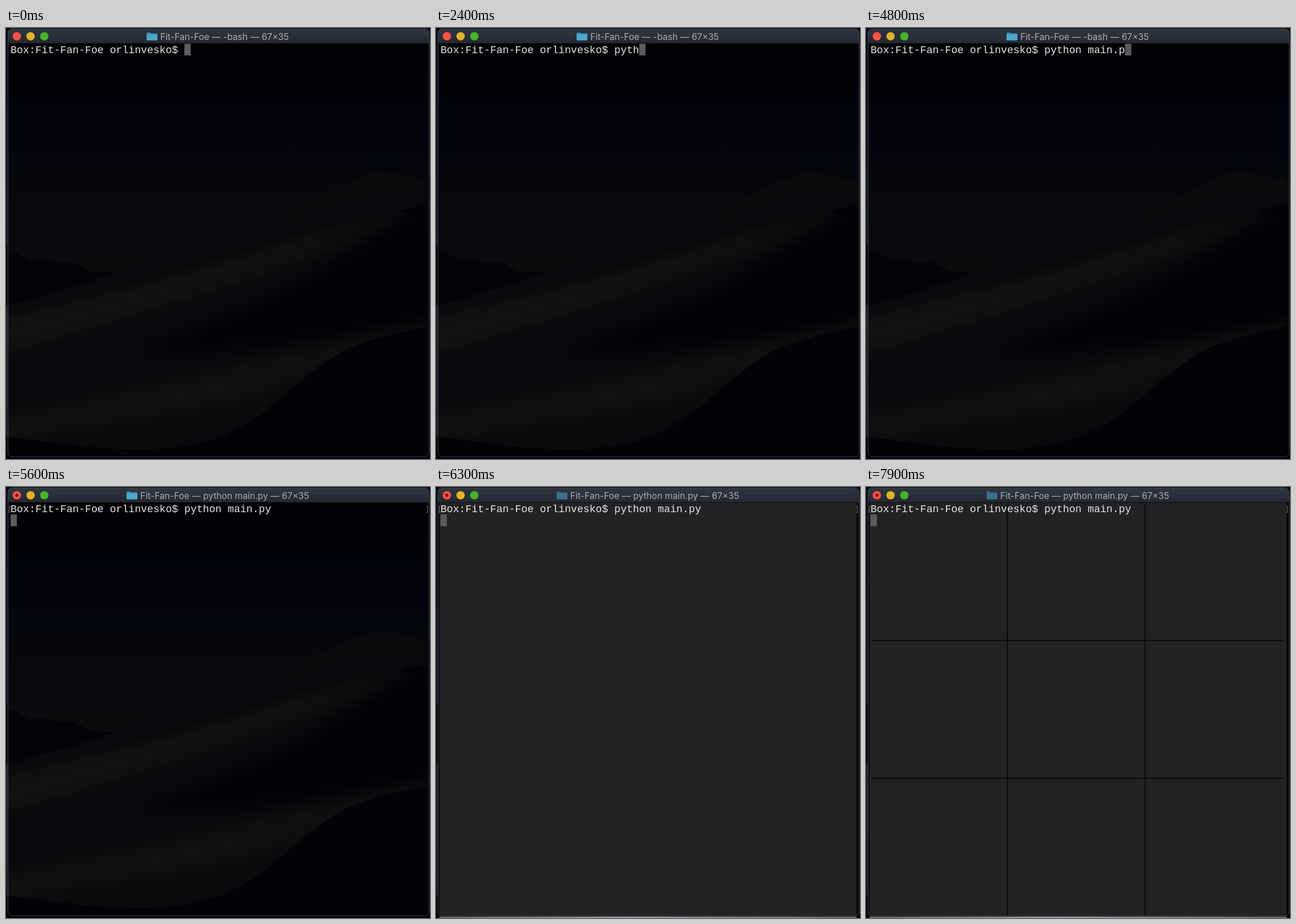
Recreate the animation shown at these times as an HTML page. Size 742x754 px, loop 8000 ms.

```html
<!DOCTYPE html>
<html lang="en">
<head>
<meta charset="utf-8">
<title>Terminal session</title>
<style>
  html, body { margin: 0; width: 100%; height: 100%; overflow: hidden; background: #02030a; }
  svg { display: block; width: 742px; height: 754px; }
  text { white-space: pre; }
  .mono { font: 18.1px "Liberation Mono", monospace; fill: #e6e6e6; }
  .title { font: 15.6px Inter, sans-serif; fill: #a9acb2; }
</style>
</head>
<body>
<svg viewBox="0 0 742 754">
  <defs>
    <linearGradient id="bar" x2="0" y2="1">
      <stop stop-color="#303641"/><stop offset="1" stop-color="#232831"/>
    </linearGradient>
    <linearGradient id="sky" gradientUnits="userSpaceOnUse" x1="0" y1="27" x2="0" y2="440">
      <stop stop-color="#000104"/><stop offset=".2" stop-color="#010309"/>
      <stop offset=".4" stop-color="#02050e"/><stop offset=".56" stop-color="#05070d"/>
      <stop offset=".75" stop-color="#08090d"/><stop offset="1" stop-color="#0b0b0d"/>
    </linearGradient>
    <linearGradient id="edge" x2="0" y2="1">
      <stop stop-color="#060912"/><stop offset=".5" stop-color="#131720"/>
      <stop offset=".51" stop-color="#030408"/><stop offset=".64" stop-color="#030408"/>
      <stop offset=".645" stop-color="#1d2027"/><stop offset=".945" stop-color="#191c23"/>
      <stop offset=".95" stop-color="#030408"/>
    </linearGradient>
    <linearGradient id="rim">
      <stop stop-color="#6c6c6e"/><stop offset=".45" stop-color="#a4a4a6"/><stop offset="1" stop-color="#6c6c6e"/>
    </linearGradient>
    <filter id="soft" filterUnits="userSpaceOnUse" x="-100" y="140" width="960" height="720" color-interpolation-filters="sRGB">
      <feGaussianBlur stdDeviation="15"/>
    </filter>
    <clipPath id="screen"><path d="M4 27H740V743Q740 749 734 749H10Q4 749 4 743Z"/></clipPath>
    <clipPath id="dune"><path d="M0 486C70 467 130 449 190 428C280 397 370 364 460 330C520 306 575 282 630 256Q655 246 742 269V754H0Z"/></clipPath>
  </defs>

  <rect width="742" height="754" fill="#02030a"/>
  <rect width="3" height="754" fill="url(#edge)"/>

  <g clip-path="url(#screen)">
    <rect y="27" width="742" height="727" fill="url(#sky)"/>
    <g fill="#20232b">
      <circle cx="410" cy="101" r=".9"/><circle cx="26" cy="80" r=".7"/><circle cx="500" cy="85" r=".7"/>
      <circle cx="79" cy="135" r=".8"/><circle cx="505" cy="210" r=".7"/>
    </g>
    <path d="M0 386L24 396L44 406L68 404L92 411L112 409L134 419L152 427L190 428L150 445L0 488Z" fill="#030408"/>
    <g clip-path="url(#dune)">
      <g filter="url(#soft)" fill="none">
        <rect x="-60" y="180" width="860" height="640" fill="#08090c"/>
        <path d="M470 335Q560 305 650 258L790 285" stroke="#0b0b0d" stroke-width="26"/>
        <path d="M200 455Q430 375 600 310" stroke="#06070a" stroke-width="28"/>
        <path d="M-40 580V515C160 475 400 405 700 315C560 400 350 465 -40 580Z" fill="#121211"/>
        <path d="M705 325L800 330V505C640 520 460 565 210 570C390 515 560 430 705 325Z" fill="#020206"/>
        <path d="M-40 735V685C170 645 400 590 780 515V545C600 570 520 610 440 640C280 690 140 690 -40 735Z" fill="#111110"/>
        <path d="M120 735Q330 715 480 635" stroke="#0b0b0c" stroke-width="24"/>
      </g>
      <path d="M688 320Q704 313 742 313V344Q720 330 688 320Z" fill="#020307"/>
    </g>
    <path d="M0 715C60 721 130 735 215 737C330 740 390 717 450 673C500 633 535 595 595 562C640 542 690 533 742 521V754H0Z" fill="#020207"/>
  </g>

  <g id="board">
    <rect x="6" y="27" width="730" height="723" fill="#232123"/>
    <path d="M4 27h2v723h-2zM736 27h4v723h-4z" fill="#050609"/>
    <rect x="6" y="751.5" width="730" height="2.5" fill="url(#rim)"/>
    <path id="grid" d="M247.5 31V749M488.5 31V749M10 268.5H729M10 509.5H729" stroke="#070709" stroke-width="1.8"/>
  </g>

  <path d="M3 27V9Q3 2 10 2H733Q740 2 740 9V27Z" fill="url(#bar)"/>
  <path d="M4 27H740" stroke="#0b0d12"/>
  <rect x="3.5" y="1.5" width="737" height="748.5" rx="7" fill="none" stroke="#3e4149"/>

  <circle cx="19" cy="14.5" r="7.3" fill="#ff5145"/>
  <circle cx="43" cy="14.5" r="7.3" fill="#e1b425"/>
  <circle cx="67" cy="14.5" r="7.3" fill="#46b52b"/>
  <circle id="busy" cx="19" cy="14.5" r="2.7" fill="#750b08"/>

  <g id="heading">
    <g id="folder">
      <path d="M0 9.5Q0 8 1.5 8H6L8 9.5H17.5Q19 9.5 19 11V20Q19 21.5 17.5 21.5H1.5Q0 21.5 0 20Z" fill="#3f92b6"/>
      <path d="M0 11.5H19V20Q19 21.5 17.5 21.5H1.5Q0 21.5 0 20Z" fill="#4ca8ce"/>
    </g>
    <text class="title" x="24" y="20.5">Fit-Fan-Foe</text>
    <text class="title" id="process" x="114" y="20.5"></text>
  </g>

  <rect id="cursor" width="11" height="20.5" fill="#5c5c5e"/>
  <text class="mono" id="line" x="8" y="44"></text>
  <path id="marks" d="M7.5 33.5H5.5V44.5H7.5M735.5 33.5H737.5V44.5H735.5" fill="none" stroke="#77787b"/>
</svg>
<script>
  const LOOP = 8000, CHAR = 10.862;
  const PROMPT = "Box:Fit-Fan-Foe orlinvesko$ ";
  const COMMAND = "python main.py";
  const KEY_TIMES = [1800, 2000, 2200, 2400, 2500, 2700, 2900, 3000, 3200, 3400, 3500, 4200, 4700, 5000];
  const RUN = 5600, BLUR = 6000, BOARD = 6300, GRID = 6400;

  const el = id => document.getElementById(id);
  const show = (id, on) => el(id).setAttribute("visibility", on ? "visible" : "hidden");
  const start = performance.now();

  function draw(t) {
    const running = t >= RUN;
    const typed = KEY_TIMES.filter(k => k <= t).length;
    const line = PROMPT + COMMAND.slice(0, typed);

    el("line").textContent = line;
    el("cursor").setAttribute("x", running ? 8 : 8 + line.length * CHAR);
    el("cursor").setAttribute("y", running ? 48 : 27.5);
    el("heading").setAttribute("transform", `translate(${running ? 211 : 246})`);
    el("process").textContent = running ? "— python main.py — 67×35" : "— -bash — 67×35";
    el("folder").setAttribute("opacity", t >= BLUR ? .55 : 1);
    show("busy", running);
    show("marks", running);
    show("board", t >= BOARD);
    show("grid", t >= GRID);
  }

  function tick() {
    draw((performance.now() - start) % LOOP);
    requestAnimationFrame(tick);
  }
  tick();
</script>
</body>
</html>
```
